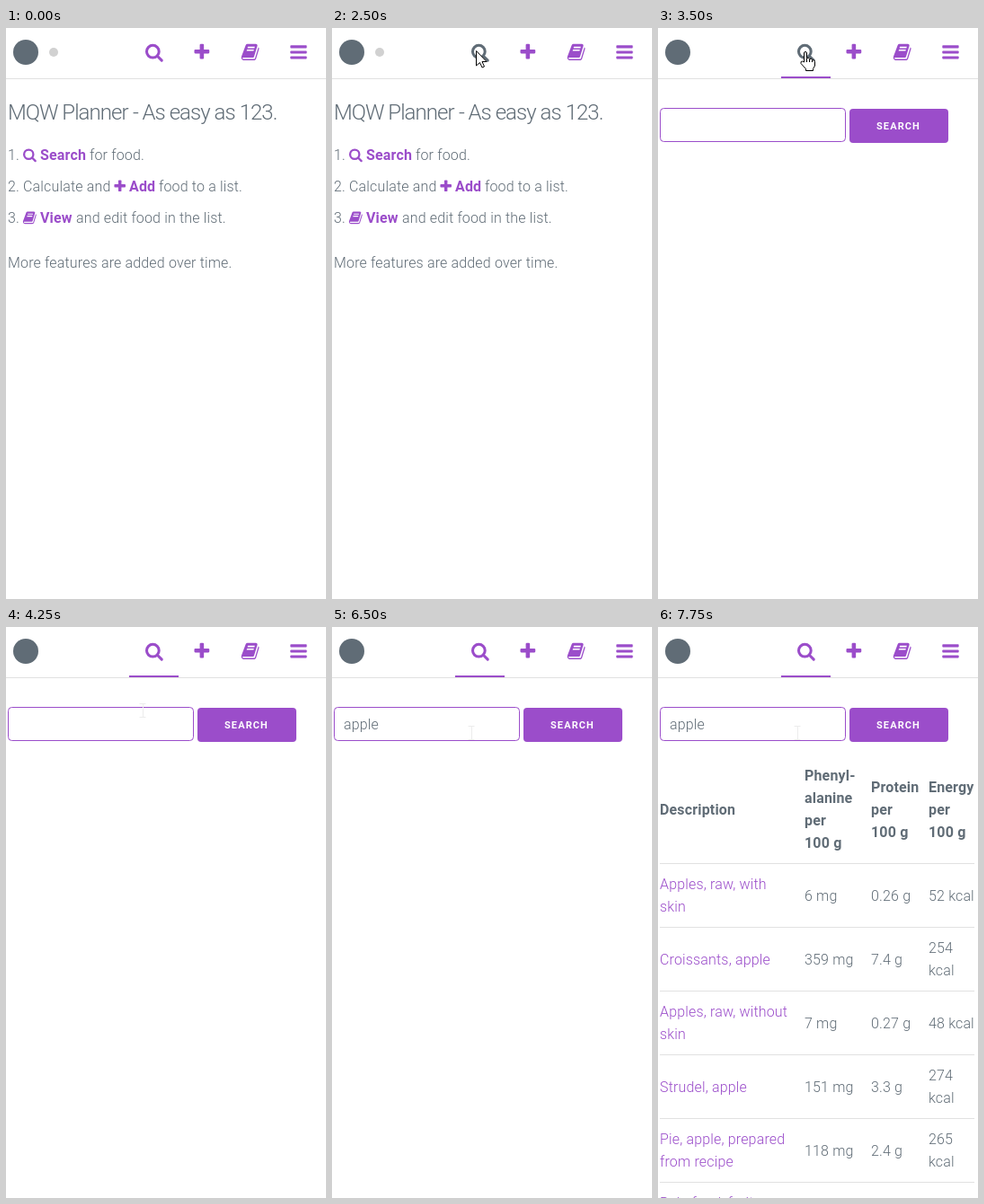
Recreate the animation shown at these times as an HTML page. Size 356 by 636 pixels, loop 8000 ms.

```html
<!DOCTYPE html>
<html lang="en">
<head>
<meta charset="utf-8">
<title>Food search</title>
<style>
  html, body { margin: 0; width: 100%; height: 100%; overflow: hidden; background: #fff; }
  svg { display: block; width: 356px; height: 636px; }
  text { font: 300 16px Roboto, sans-serif; letter-spacing: .16px; fill: #606c76; white-space: pre; }
  .b { font-weight: 700; }
  .p { fill: #9b4dca; }
  .h { font-size: 24px; letter-spacing: -.95px; }
  .btn { font-size: 11px; font-weight: 700; letter-spacing: 1.1px; fill: #fff; }
  .icon { fill: #9b4dca; color: #9b4dca; }
  .hover { fill: #606c76; color: #606c76; }
  .rule { stroke: #e1e1e1; }
  .cursor { fill: #fff; stroke: #000; }
</style>
</head>
<body>
<svg viewBox="0 0 356 636">
  <defs>
    <g id="search" fill="none" stroke="currentColor" stroke-width="256">
      <circle cx="768" cy="832" r="576"/>
      <path d="M1190 1254L1600 1664" stroke-linecap="round"/>
    </g>
    <g id="plus">
      <rect x="192" y="640" width="1408" height="384" rx="96"/>
      <rect x="704" y="128" width="384" height="1408" rx="96"/>
    </g>
    <path id="book" fill-rule="evenodd" d="M1703 478q40 57 18 129l-275 906q-19 64-76 107t-123 44H324q-77 0-148-54T76 1479Q50 1400 80 1300L480 230Q550 100 670 128H1431q74 0 114 56t18 130l-274 906q-36 119-72 154t-128 34H220q-27 0-38 15-11 16-1 43 24 70 144 70h923q29 0 56-15t35-42l300-987q7-22 5-57 38 15 59 43zM640 512H1291L1330 384H679zM557 768H1208L1247 640H596z"/>
    <g id="bars">
      <rect x="128" y="256" width="1536" height="256" rx="64"/>
      <rect x="128" y="768" width="1536" height="256" rx="64"/>
      <rect x="128" y="1280" width="1536" height="256" rx="64"/>
    </g>
  </defs>

  <path class="rule" d="M0 56.5H356"/>
  <circle cx="22" cy="27" r="14" fill="#606c76"/>
  <g id="nav"></g>

  <g id="home">
    <circle cx="53" cy="27" r="5" fill="#d1d1d1"/>
  </g>

  <g id="find">
    <rect x="137" y="54" width="55" height="2" class="p"/>
    <rect x="2.5" y="89.5" width="206" height="37" rx="4" fill="#fff" stroke="#9b4dca"/>
    <rect x="213" y="90" width="110" height="38" rx="4" class="p"/>
    <text x="243" y="113" class="btn">SEARCH</text>
    <text x="13" y="114" id="query"></text>
    <rect id="caret" y="99" width="1" height="19" fill="#444"/>
  </g>

  <g id="table"></g>

  <path id="arrow" class="cursor" d="M.5.5V17L4.500 13.500 7 19 9.500 18 7 12.500H12z"/>
  <path id="hand" class="cursor" d="M4.500 12V2Q4.500.5 6 .5T7.500 2V7.500q3-1 3 1 3-1 3 1 3 0 3 2V16l-2 3.500V21.500H6.500V19.500L1 13.500q-.5-2.500 1.500-2.500zM7.500 8v4M10.500 9v3M13.500 10v2"/>
  <path id="beam" fill="none" stroke="#ececec" d="M-3.500-7.500h7M.5-8V8M-3.500 7.500h7"/>
</svg>
<script>
const $ = id => document.getElementById(id);
const add = (parent, html) => parent.insertAdjacentHTML('beforeend', html);
const text = (parent, x, y, s, cls = '') => add(parent, `<text x="${x}" y="${y}" class="${cls}">${s}</text>`);
const icon = (parent, name, x, y, size) =>
  add(parent, `<use href="#${name}" class="icon" transform="translate(${x} ${y}) scale(${size / 1792})"/>`);

// Navigation bar
[['search', 154.2], ['plus', 207.2], ['book', 261], ['bars', 314.8]]
  .forEach(([name, x]) => icon($('nav'), name, x, 16.3, 21.33));
const searchIcon = $('nav').firstElementChild;

// Start page
const home = $('home');
text(home, 2, 102, 'MQW Planner', 'h');
text(home, 141, 102, '-', 'h');
text(home, 151.5, 102, 'As easy as 123.', 'h');
[
  ['1.', 'search', 18.4, 'Search', 38, 'for food.', 93],
  ['2. Calculate and', 'plus', 118.7, 'Add', 137, 'food to a list.', 170],
  ['3.', 'book', 18.3, 'View', 38, 'and edit food in the list.', 78]
].forEach(([start, name, iconX, word, wordX, rest, restX], i) => {
  const y = 147 + 35 * i;
  text(home, 2, y, start);
  icon(home, name, iconX, y - 13.7, 16);
  text(home, wordX, y, word, 'b p');
  text(home, restX, y, rest);
});
text(home, 2, 267, 'More features are added over time.');

// Result table: cells are centred vertically, "|" breaks a line
const table = $('table'), columns = [2, 163, 237, 301];
const row = (cells, mid, cls) => cells.forEach((cell, col) => {
  const lines = cell.split('|');
  lines.forEach((s, i) =>
    text(table, columns[col], mid + 5 + 25 * (i - (lines.length - 1) / 2), s, cls || (col ? '' : 'p')));
});
row(['Description', 'Phenyl-|alanine|per|100 g', 'Protein|per|100 g', 'Energy|per|100 g'], 203.5, 'b');
[
  ['Apples, raw, with|skin', '6 mg', '0.26 g', '52 kcal'],
  ['Croissants, apple', '359 mg', '7.4 g', '254|kcal'],
  ['Apples, raw, without|skin', '7 mg', '0.27 g', '48 kcal'],
  ['Strudel, apple', '151 mg', '3.3 g', '274|kcal'],
  ['Pie, apple, prepared|from recipe', '118 mg', '2.4 g', '265|kcal'],
  ['Babyfood, fruit|dessert', '', '', '']
].forEach((cells, i) => {
  add(table, `<path class="rule" d="M2 ${263.5 + 71 * i}H352"/>`);
  row(cells, 299.5 + 71 * i);
});

// Steps: [start time, value...]
const pointer = [
  [0, ''],
  [750, 'arrow', 197, 423], [1000, 'arrow', 190, 280],
  [1250, 'beam', 188, 227], [1500, 'beam', 182, 163], [1750, 'beam', 176, 99],
  [2000, 'hand', 158, 41], [2250, 'hand', 158, 25], [2500, 'arrow', 160, 25],
  [3250, 'hand', 158, 26], [3750, 'hand', 157, 28], [4000, 'hand', 154, 43],
  [4250, 'beam', 152, 93], [4500, 'beam', 155, 118]
];
const typing = [[0, ''], [5500, 'a'], [5750, 'app'], [6000, 'apple']];
const blink = [[3750, 4250], [4750, 5250], [5500, 6500], [7250, 7750]];
const at = (steps, t) => steps.filter(s => s[0] <= t).pop();
const show = (el, on) => el.setAttribute('visibility', on ? 'visible' : 'hidden');

function draw() {
  const t = performance.now() % 8000;
  show(home, t < 2750);
  show($('find'), t >= 2750);
  show(table, t >= 7250);
  searchIcon.classList.toggle('hover', t >= 2000 && t < 4250);

  const query = $('query');
  query.textContent = at(typing, t)[1];
  const caret = $('caret');
  caret.setAttribute('x', Math.round(13 + (query.textContent && query.getComputedTextLength())));
  show(caret, blink.some(([on, off]) => t >= on && t < off));

  const [, kind, x, y] = at(pointer, t);
  for (const name of ['arrow', 'hand', 'beam']) {
    show($(name), name === kind);
    if (name === kind) $(name).setAttribute('transform', `translate(${x} ${y})`);
  }
  requestAnimationFrame(draw);
}
draw();
</script>
</body>
</html>
```
